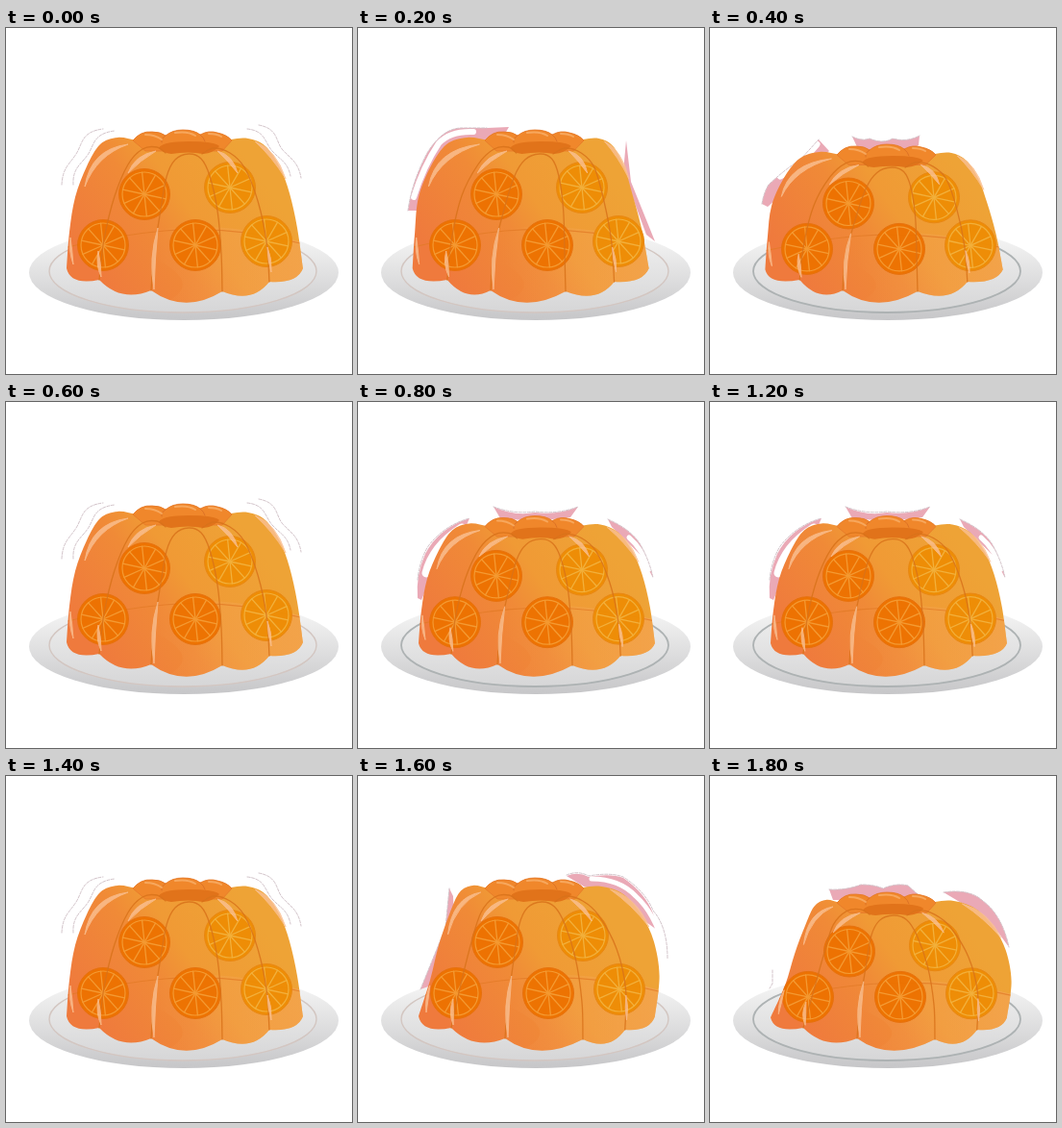
Recreate the animation shown at these times as an HTML page. Size 360 px wide and 360 px high, loop 2000 ms.

```html
<!DOCTYPE html>
<html lang="en">
<head>
<meta charset="utf-8">
<title>Orange jelly</title>
<style>
html, body { margin: 0; width: 100%; height: 100%; overflow: hidden; background: #fff; }
svg { display: block; width: 100vw; height: 100vh; }
</style>
</head>
<body>
<svg viewBox="0 0 360 360">
  <defs>
    <linearGradient id="plate" x1="0" y1="0" x2="0" y2="1">
      <stop offset=".15" stop-color="#f3f3f3"/><stop offset=".6" stop-color="#dcdcdd"/><stop offset="1" stop-color="#c6c6c8"/>
    </linearGradient>
    <linearGradient id="well" x1="0" y1="0" x2="0" y2="1">
      <stop offset=".2" stop-color="#ececec"/><stop offset="1" stop-color="#d6d6d7"/>
    </linearGradient>
    <linearGradient id="jelly" gradientUnits="userSpaceOnUse" x1="90" y1="255" x2="255" y2="140">
      <stop offset="0" stop-color="#ef7a3d"/><stop offset=".42" stop-color="#f08a37"/>
      <stop offset=".6" stop-color="#f09a35"/><stop offset="1" stop-color="#eea336"/>
    </linearGradient>
    <linearGradient id="low" gradientUnits="userSpaceOnUse" x1="150" y1="0" x2="310" y2="0">
      <stop offset="0" stop-color="#f6a860" stop-opacity="0"/><stop offset="1" stop-color="#f6a45a" stop-opacity=".55"/>
    </linearGradient>
    <clipPath id="clip"><path id="clipPath"/></clipPath>
  </defs>
  <rect width="360" height="360" fill="#fff"/>
  <ellipse cx="185" cy="254.5" rx="161" ry="49.5" fill="url(#plate)"/>
  <ellipse id="rim" cx="184" cy="253" rx="139" ry="43" fill="url(#well)"/>
  <g id="aura"></g>
  <g id="body"></g>
</svg>
<script>
const $ = id => document.getElementById(id);
const clamp = v => Math.max(0, Math.min(1, v));
const r1 = v => Math.round(v * 10) / 10;

// drop: top sinks; left/right: flanks; foot: how far the base follows;
// inL/inR: front ribs
const REST = { drop: 0, left: 0, right: 0, foot: 0, inL: 0, inR: 0 };
const LEFT = { drop: 0, left: -9, right: -9, foot: .7, inL: -13, inR: -9 };
const RIGHT = { drop: 0, left: 12, right: 12, foot: 0, inL: 2, inR: 9 };
const LEFT_LOW = { ...LEFT, drop: 15, left: -8, right: -6 };
const RIGHT_LOW = { ...RIGHT, drop: 15, left: 16 };
const SQUASH = { drop: 12.5, left: 0, right: 1, foot: 0, inL: -6, inR: -2 };

const PINK = "#eaa9b6", EDGE = "#d2c3c9";
const fill = (d, c = PINK) => `<path d="${d}" fill="${c}"/>`;
const line = (d, c, w = 1, more = "") =>
  `<path d="${d}" fill="none" stroke="${c}" stroke-width="${w}" stroke-linecap="round" ${more}/>`;
const white = (d, w) => line(d, "#fff", w);
const edge = d => line(d, EDGE, 1, 'stroke-dasharray="3 1.5"');

REST.aura = [
  "M58 163C59 145 66 142 73 131S78 108 101 105",
  "M70 163C69 146 78 142 85 132S90 110 113 107",
  "M251 105C270 107 269 119 277 128S293 139 296 154",
  "M263 101C284 105 280 118 288 127S304 139 307 156"
].map(edge).join("");

LEFT.aura =
  fill("M52 190Q56 160 72 130Q88 104 108 104L134 104L157 103L150 115L100 125L70 190Z") +
  white("M58 176Q68 144 84 120Q96 107 120 108", 6) +
  edge("M52 190Q56 160 72 130Q88 104 108 104L134 104") +
  fill("M279 117L284 160L309 222L300 215L276 150Z");

LEFT_LOW.aura =
  fill("M54 183Q56 171 61 163Q78 147 94 137L113 116L124 128L80 168L60 186Z") +
  white("M73 154Q92 145 111 121", 7) +
  edge("M54 183Q56 171 61 163Q78 147 94 137L113 116") +
  fill("M148 113Q158 118 166 115Q180 121 190 115Q205 119 218 112L217 122L205 128H155Z") +
  edge("M148 113Q158 118 166 115Q180 121 190 115Q205 119 218 112");

SQUASH.aura =
  fill("M62 204Q60 180 70 158Q84 131 116 121L112 130L82 168L66 206Z") +
  white("M71 178Q78 150 108 131", 9) +
  edge("M62 185Q64 165 73 150Q90 128 116 121") +
  fill("M141 109Q162 119 184 115Q208 118 229 109L221 120L184 124L148 121Z") +
  edge("M141 109Q162 117 184 114Q208 117 229 109") +
  fill("M260 122Q283 132 293 147Q303 164 307 183L295 160L264 130Z") +
  white("M282 141Q296 153 303 174", 5) +
  edge("M260 122Q283 132 293 147Q303 164 307 183");

RIGHT.aura =
  fill("M65 222L91 158L95 117L99 125L100 150L76 218Z") + edge("M65 222L91 158L95 117") +
  fill("M217 104Q229 99 240 105Q263 101 276 106Q299 122 307 143L311 160L290 145L270 125L235 115Z") +
  white("M243 107Q272 107 289 125Q309 143 318 178", 5) +
  edge("M217 103Q229 98 240 104Q263 100 276 105Q299 120 307 140Q322 157 322 190");

RIGHT_LOW.aura =
  fill("M124 118Q142 119 157 113Q171 113 180 117Q194 111 206 114L216 123L210 129H128Z") +
  edge("M124 118Q142 119 157 113Q171 113 180 117Q194 111 206 114L216 123") +
  fill("M243 121Q270 117 284 130Q304 145 311 178L300 163L268 136Z") +
  edge("M243 121Q270 117 284 130Q304 145 311 178") +
  edge("M65 202V216L62 221");

const STEPS = [REST, LEFT, LEFT_LOW, REST, SQUASH, REST, SQUASH, REST, RIGHT, RIGHT_LOW];
const STEP = 200;

function bend(p, x, y) {
  const side = Math.max(clamp((250 - y) / 50), p.foot);
  const outer = p.left * clamp((130 - x) / 50) + p.right * clamp((x - 245) / 50);
  const rib = clamp((y - 120) / 100) * (x < 188
    ? p.inL * clamp((x - 97) / 54)
    : p.inR * clamp((309 - x) / 84));
  return [x + outer * side + rib, y + p.drop * clamp((262 - y) / 140)];
}

// Bends every coordinate pair of a path
const warp = (p, d) => d.replace(/(-?[\d.]+) (-?[\d.]+)/g,
  (_, x, y) => bend(p, +x, +y).map(r1).join(" "));

// Smooth curve through a list of points
function smooth(pts) {
  let d = `M${pts[0].join(" ")}`;
  for (let i = 0; i < pts.length - 1; i++) {
    const a = pts[i - 1] || pts[i], b = pts[i], c = pts[i + 1], e = pts[i + 2] || c;
    const h = j => [r1(b[j] + (c[j] - a[j]) / 6), r1(c[j] - (e[j] - b[j]) / 6)];
    const [x1, x2] = h(0), [y1, y2] = h(1);
    d += `C${x1} ${y1} ${x2} ${y2} ${r1(c[0])} ${r1(c[1])}`;
  }
  return d;
}
const curve = (p, pts) => smooth(pts.map(([x, y]) => bend(p, x, y)));

const TOP = [[63, 250], [66, 212], [72, 176], [84, 144], [98, 121], [116, 114], [136, 117],
  [160, 122], [190, 120], [215, 121], [234, 116], [252, 115], [270, 123], [285, 145], [295, 172], [303, 208], [309, 250]];
const BASE = "Q 303 266 274 264Q 256 287 225 274Q 186 298 151 273Q 120 286 97 262Q 67 268 63 250Z";
const BACK = "M132 117Q 140 107 152 108Q 161 108 166 112Q 173 106 184 106Q 196 106 202 111Q 211 106 220 109Q 230 111 235 117L 225 128L 145 128Z";
const HOLE = "M159 125Q 162 118 190 118Q 217 118 222 123Q 216 130 205 131Q 190 128 172 131Q 163 130 159 125Z";
const RIBS = [
  [[97, 262], [102, 220], [113, 175], [127, 142], [142, 126], [157, 124], [166, 130]],
  [[151, 273], [154, 235], [160, 195], [167, 155], [176, 137], [190, 131], [203, 136], [212, 154], [220, 190], [224, 235], [225, 274]],
  [[204, 131], [216, 125], [233, 130], [248, 145], [262, 180], [271, 222], [274, 264]]
];
const SHINE = [
  [82, 165, 88, 126, 127, 121, 9], [127, 151, 134, 132, 156, 128, 8],
  [220, 128, 236, 132, 241, 151, 8], [259, 118, 281, 126, 291, 157, 9],
  [67, 218, 65, 232, 70, 246, 4], [96, 232, 93, 246, 99, 259, 6],
  [158, 208, 148, 240, 154, 272, 7], [272, 228, 277, 240, 276, 254, 5]
];
const SLICES = [[144, 173, 0], [233, 166, 1], [101, 226, 0], [197, 226, 0], [271, 222, 1]];

// Crescent: two arcs sharing their ends
function shine(p, [x1, y1, cx, cy, x2, y2, w]) {
  const mx = (x1 + x2) / 2 - cx, my = (y1 + y2) / 2 - cy, n = Math.hypot(mx, my) || 1;
  const d = `M${x1} ${y1}Q ${cx} ${cy} ${x2} ${y2}Q ${cx + mx / n * w} ${cy + my / n * w} ${x1} ${y1}Z`;
  return `<path d="${warp(p, d)}" fill="#fac092" stroke="#fac092" stroke-linejoin="round" opacity=".82"/>`;
}

function slice(p, [x, y, gold]) {
  const cy = r1(y + p.drop * clamp((262 - y) / 140)), cx = x + (p.right > 5 ? 1 : 0);
  const dark = gold ? "#ee8d05" : "#ed7200", pale = gold ? "#f3b13c" : "#f59b32";
  let s = `<circle r="26.5" fill="${dark}" stroke="${gold ? "#e88612" : "#e6700c"}"/>` +
    `<circle r="23" fill="none" stroke="${pale}" stroke-width="1.2"/>`;
  for (let i = 0; i < 10; i++) {
    const a = (i * 36 + 12) * Math.PI / 180;
    s += line(`M0 0L${r1(23 * Math.cos(a))} ${r1(23 * Math.sin(a))}`, pale, 1.3);
  }
  return `<g transform="translate(${cx} ${cy})" opacity=".96">${s}</g>`;
}

function body(p) {
  const shape = curve(p, TOP) + warp(p, BASE);
  $("clipPath").setAttribute("d", shape);
  const rib = "#d9731b";
  return `<path d="${warp(p, BACK)}" fill="#f0872b"/>` +
    fill(shape, "url(#jelly)") +
    `<path d="${warp(p, BACK)}" fill="#f0872b" stroke="#e5792a" stroke-width=".8"/>` +
    line(warp(p, "M166 112Q 161 115 162 119M202 111Q 206 114 207 118"), "#dd7226") +
    line(warp(p, "M145 111Q 155 111 162 116M176 109Q 189 107 197 112M211 110Q 219 110 224 113"), "#f7a75c", 2) +
    fill(warp(p, HOLE), "#e1731a") +
    `<g clip-path="url(#clip)">` +
    fill(warp(p, "M60 230Q 115 215 190 206Q 255 207 312 224L 312 292L 150 292Q 215 270 155 240Z"), "url(#low)") +
    line(warp(p, "M64 228Q 118 215 165 211Q 235 205 306 224"), "#e27a26", 1.2, 'opacity=".75"') +
    `</g>` +
    SLICES.map(s => slice(p, s)).join("") +
    RIBS.map(r => line(curve(p, r), rib, 1.3, 'opacity=".85"')).join("") +
    SHINE.map(s => shine(p, s)).join("");
}

let shown = -1;
function draw(ms) {
  const i = Math.floor(ms / STEP) % STEPS.length;
  if (i !== shown) {
    const p = STEPS[i];
    shown = i;
    $("aura").innerHTML = p.aura;
    $("body").innerHTML = body(p);
    $("rim").setAttribute("stroke", p.drop ? "#adb2b3" : "#d3c6c1");
    $("rim").setAttribute("stroke-width", p.drop ? 1.8 : 1.4);
  }
}
function tick() {
  draw(performance.now());
  requestAnimationFrame(tick);
}
tick();
</script>
</body>
</html>
```
